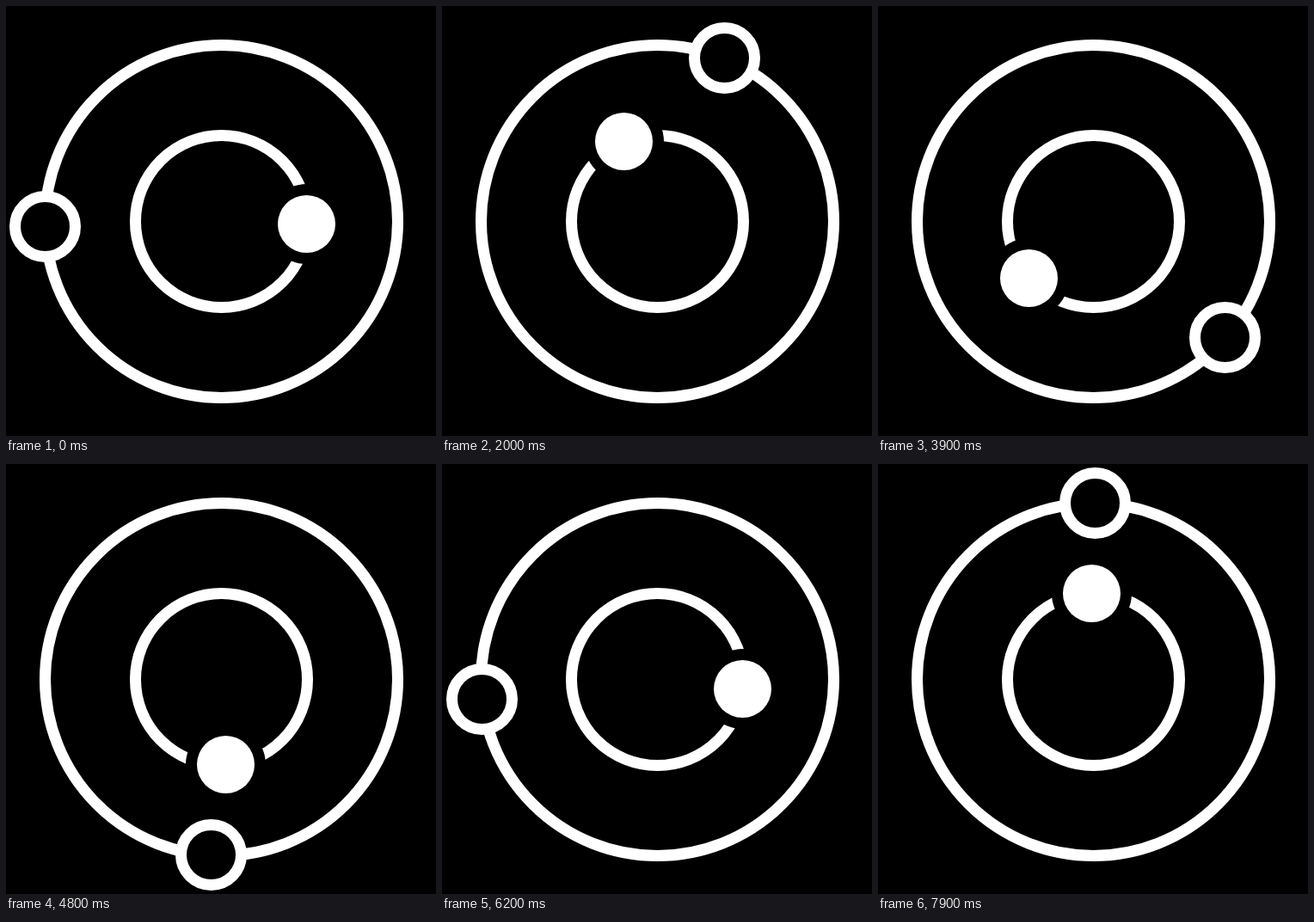
Recreate the animation shown at these times as an HTML page without scripts. Size 500x500 px, loop 8000 ms.

```html
<!DOCTYPE html>
<html lang="en">
<head>
<meta charset="utf-8">
<title>Two orbits</title>
<style>
  @property --a {
    syntax: "<number>";
    inherits: true;
    initial-value: -0.03375;
  }

  html, body {
    margin: 0;
    width: 100%;
    height: 100%;
    overflow: hidden;
    background: #000;
  }

  svg {
    display: block;
    width: 100%;
    height: 100%;
    animation: orbit 8s steps(80, end) infinite;
  }

  .ring {
    fill: none;
    stroke: #fff;
    stroke-width: 13px;
  }

  .moon { fill: #000; }

  /* --a is the angle in radians, one radian per second */
  .body {
    --x: calc(250px + var(--rx) * cos(var(--a)));
    --y: calc(250px - var(--ry) * sin(var(--a)));
    transform: translate(var(--x), var(--y));
  }

  .outer { --rx: -205px; --ry: 205px; }
  .inner { --rx: 100px; --ry: 100px; }

  /* bodies sit on whole pixels */
  @supports (width: round(down, 1px, 1px)) {
    .body {
      transform: translate(round(down, var(--x), 1px), round(down, var(--y), 1px));
    }
  }

  @keyframes orbit {
    from { --a: -0.03375; }
    to { --a: 7.96625; }
  }
</style>
</head>
<body>
<svg viewBox="0 0 500 500">
  <circle class="ring" cx="250.5" cy="250.5" r="205"/>
  <circle class="ring" cx="250.5" cy="250.5" r="100"/>
  <g class="body inner">
    <circle cx=".5" cy=".5" r="46.5" fill="#000"/>
    <circle cx=".5" cy=".5" r="33.5" fill="#fff"/>
  </g>
  <g class="body outer">
    <circle class="ring moon" cx=".5" cy=".5" r="35"/>
  </g>
</svg>
</body>
</html>
```
